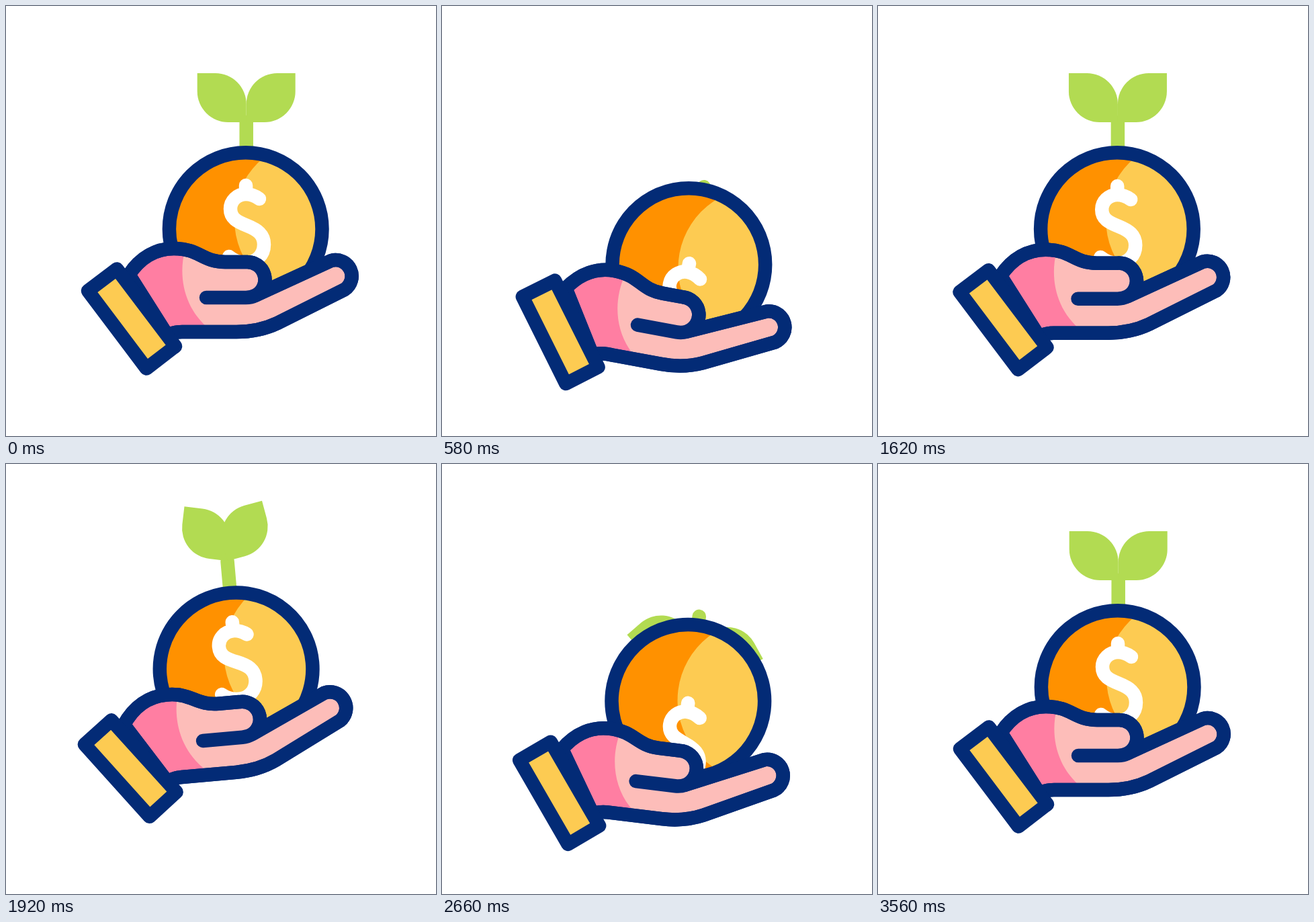
These frames come from a looping animation (640 by 640 pixels, 3.6 s). An HTML page:

```html
<!DOCTYPE html>
<html lang="en">
<head>
<meta charset="utf-8">
<title>Growing coin in hand</title>
<style>
  html, body { margin: 0; width: 100%; height: 100%; overflow: hidden; background: #fff; }
  svg { display: block; width: 100vw; height: 100vh; }
  .line { stroke: #032b76; stroke-width: 20.5; stroke-linecap: round; stroke-linejoin: round; }
  .mark { fill: none; stroke: #fff; stroke-width: 20.5; stroke-linecap: round; stroke-linejoin: round; }
</style>
</head>
<body>
<svg viewBox="0 0 640 640">
  <defs>
    <clipPath id="disc"><circle cx="356.7" cy="332" r="110"/></clipPath>
    <path id="leaf" d="M0 0V-27A46 46 0 0 0 -46 -73H-73V-46A46 46 0 0 0 -27 0Z"/>
  </defs>
  <g id="coin">
    <g fill="#b2db52">
      <path id="stem" stroke="#b2db52" stroke-width="20.5" stroke-linecap="round"/>
      <use id="left" href="#leaf"/>
      <use id="right" href="#leaf"/>
    </g>
    <circle cx="356.7" cy="332" r="113.8" fill="#ff9100"/>
    <g clip-path="url(#disc)">
      <circle cx="460" cy="318" r="120" fill="#fdcb52"/>
      <path id="dollar" class="mark" d="M377 287C370 282 364 280 357 280C344 280 334 290 334 302C334 316 344 321 359 327C374 333 384 340 384 355C384 371 372 382 357 382C346 382 338 378 332 373M357 267V280M357 382V395"/>
    </g>
    <circle cx="356.7" cy="332" r="113.8" fill="none" class="line"/>
  </g>
  <g id="hand">
    <path id="palm" fill="#fdbdb9" d="M183 400C200 374 224 361 250 361C288 361 292 381 326 381H357A26.5 26.5 0 0 1 372 430.5L484 379A24 24 0 0 1 504 422L404 472C385 481 365 485 343 485H262Q250 485 240 490Z"/>
    <path fill="#ff7ea2" d="M266 364C256 405 266 452 304 482L240 490L183 400Q215 355 266 364Z"/>
    <use href="#palm" class="line" style="fill-opacity:0"/>
    <path fill="none" class="line" d="M183 400C200 374 224 361 250 361C288 361 292 381 326 381H357A26.5 26.5 0 0 1 372 430.5L484 379A24 24 0 0 1 504 422L404 472C385 481 365 485 343 485H262Q250 485 240 490ZM298 434H357Q365 434 372 430.5"/>
    <path fill="#fdcb52" class="line" d="M165 391.500L122 424L209 539.500L252 506.500Z"/>
  </g>
</svg>
<script>
const DURATION = 3600;
const el = id => document.getElementById(id);

// Hand x, y, angle; coin drift, lift; dollar slide; stem growth; left and right leaf droop
const rest   = [0, 0, 0, 0, 0, 0, 0, 0, 0];
const raise  = [-9, -28, -6, 0, 0, -6, 3, -14, -12];
const sink   = [2, 12, 2.5, 0, 0, 37, -33, 50, 52];
const dip    = [-2, 45, 10.5, 0, 0, 63, -41, 63, 63];
const low    = [-5, 49, 10.5, 0, 0, 70, -44, 66, 66];
const toss   = [-6, 41, 7, 7, 25, 68, -32, 48, 54];
const launch = [-7, 38, 5, 5, 73, 6, 2, -10, -3];
const flight = [-11, 39, -7.6, 2, 78, -9, 1, -13, -5];
const peak   = [-11, 41, -8, 2, 95, -6, 1, -11, -6];
const high   = [-11, 41, -8, 2, 103, -6, 1, -11, -6];
const grab   = [-9, 38, -5, 0, 0, 0, 0, -4, -4];
const settle = [-0.5, 1.7, 0, -0.3, 1.7, 1, 0, 0, 0];

const timeline = [
  [0, rest], [60, rest], [330, raise], [515, sink], [580, dip], [680, low],
  [960, toss], [1050, launch], [1140, flight], [1220, peak], [1420, grab], [1620, settle],
  [1720, rest], [1990, raise], [2180, sink], [2245, dip], [2340, low],
  [2660, toss], [2760, launch], [2850, flight], [2980, high], [3310, grab],
  [3560, rest], [DURATION, rest]
];

function slope(i, k) {
  const [t, v] = timeline[i];
  return (timeline[i + 1][1][k] - v[k]) / (timeline[i + 1][0] - t);
}

// Smooth tangent that never overshoots a key pose
function tangent(i, k) {
  if (i === 0 || i === timeline.length - 1) return 0;
  const a = slope(i - 1, k), b = slope(i, k);
  return a * b > 0 ? 2 * a * b / (a + b) : 0;
}

function poseAt(time) {
  let i = 0;
  while (time >= timeline[i + 1][0]) i++;
  const [t0, from] = timeline[i], [t1, to] = timeline[i + 1];
  const d = t1 - t0, u = (time - t0) / d, w = 1 - u;
  return from.map((v, k) =>
    v * w * w * (1 + 2 * u) + to[k] * u * u * (3 - 2 * u) +
    d * u * w * (tangent(i, k) * w - tangent(i + 1, k) * u));
}

function place(id, transform) {
  el(id).setAttribute("transform", transform);
}

function draw(time) {
  const [x, y, angle, drift, lift, slide, growth, droopL, droopR] = poseAt(time);
  const turn = `rotate(${angle} 320 405)`;
  place("hand", `translate(${x} ${y}) ${turn}`);
  place("coin", `translate(${x + drift} ${y - lift}) ${turn}`);
  place("dollar", `translate(0 ${slide})`);
  el("stem").setAttribute("d", `M357.700 ${173 - growth}V240`);
  const joint = `translate(357.700 ${173 - growth * (growth < 0 ? 2.1 : 1)})`;
  place("left", `${joint} rotate(${-droopL})`);
  place("right", `${joint} scale(-1 1) rotate(${-droopR})`);
}

function tick() {
  draw(performance.now() % DURATION);
  requestAnimationFrame(tick);
}
tick();
</script>
</body>
</html>
```
